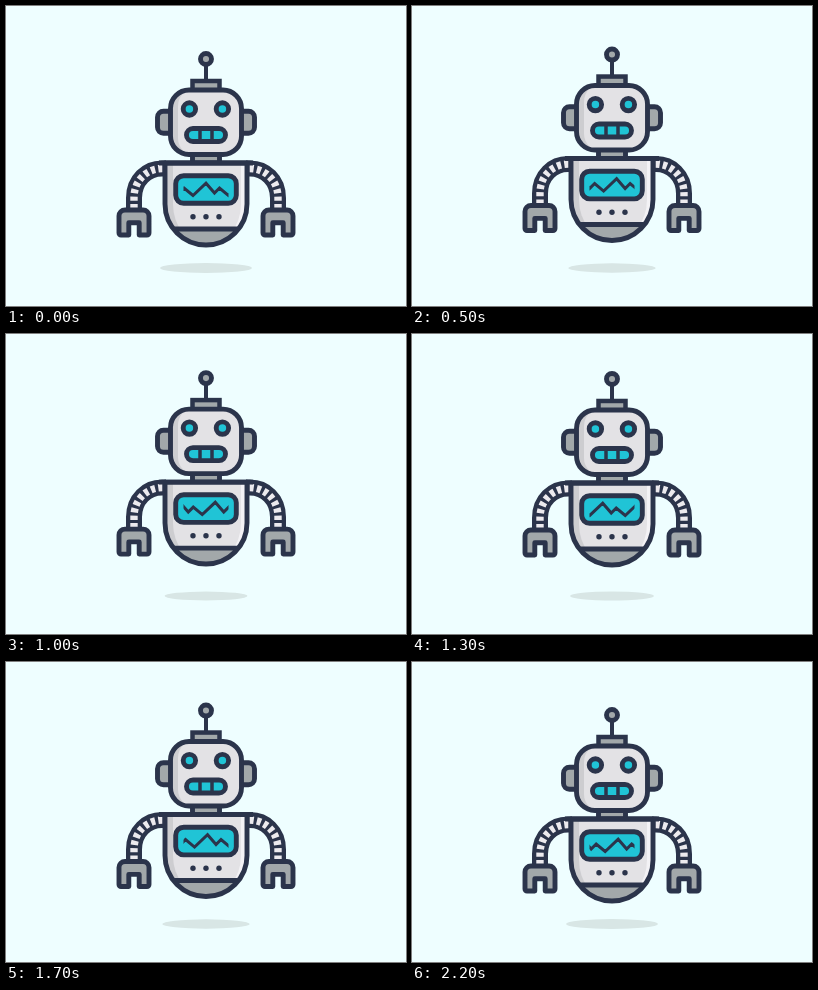
These frames come from a looping animation (400 px wide and 300 px high, 2.3 s). An HTML page:

```html
<!DOCTYPE html>
<html lang="en">
<head>
<meta charset="utf-8">
<title>Floating robot</title>
<style>
html, body { margin: 0; width: 100%; height: 100%; overflow: hidden; background: #eefeff; }
svg { display: block; width: 100%; height: 100%; }
.ink { stroke: #2b344b; stroke-width: 4.9; stroke-linejoin: round; }
.metal { fill: #a2a8aa; }
.light { fill: #e3e2e5; }
.shade { fill: #cdcdd0; }
.shine { fill: #f3f2f5; }
.glow { fill: #20c4d6; }
.none { fill: none; }
</style>
</head>
<body>
<svg viewBox="0 0 400 300">
  <defs>
    <clipPath id="headClip"><rect x="164.5" y="84" width="71" height="64.5" rx="18.5"/></clipPath>
    <clipPath id="bodyClip"><path d="M159 157H241V198A41 41 0 0 1 159 198Z"/></clipPath>
    <clipPath id="waveClip"><rect x="177.5" y="170" width="45" height="28"/></clipPath>
    <g id="arm">
      <path class="none" d="M160 162.5H156C141 162.5 128 174 128 192V204" stroke="#2b344b" stroke-width="16"/>
      <path class="none" d="M156.5 162.5C141 162.5 128 174 128 192V204" stroke="#eceaee" stroke-width="7.4" stroke-dasharray="4.2 3.2"/>
      <path class="ink metal" d="M115 229a2 2 0 0 1-2-2V210a6 6 0 0 1 6-6h18a6 6 0 0 1 6 6v17a2 2 0 0 1-2 2H133.2V216.8H122.8V229Z"/>
    </g>
    <rect id="ear" class="ink metal" x="151.5" y="105.2" width="22" height="22" rx="6"/>
    <circle id="eye" class="ink glow" cx="183.4" cy="103" r="6.2"/>
  </defs>

  <ellipse id="shadow" cx="200" cy="262" fill="#d8e6e5"/>

  <g id="robot">
    <path class="ink" d="M200 58V75" style="stroke-width:4"/>
    <circle class="ink metal" cx="200" cy="53" r="5.5"/>
    <rect class="ink metal" x="186.5" y="75" width="27" height="12" style="stroke-linejoin:miter;stroke-width:4.5"/>
    <rect class="ink metal" x="186.5" y="146" width="27" height="11"/>

    <use href="#ear"/>
    <use href="#ear" transform="matrix(-1 0 0 1 400 0)"/>
    <g clip-path="url(#headClip)">
      <rect class="shade" x="160" y="80" width="80" height="70"/>
      <rect class="light" x="172" y="82" width="76" height="68" rx="18"/>
    </g>
    <rect class="ink none" x="164.5" y="84" width="71" height="64.5" rx="18.5"/>
    <use href="#eye"/>
    <use href="#eye" x="33"/>
    <rect class="ink glow" x="180.5" y="122.5" width="39" height="13" rx="6.5"/>
    <path class="ink" d="M194 123V135M206 123V135" style="stroke-width:3.5"/>

    <use href="#arm"/>
    <use href="#arm" transform="matrix(-1 0 0 1 400 0)"/>
    <g clip-path="url(#bodyClip)">
      <rect class="shade" x="155" y="155" width="45" height="90"/>
      <rect class="shine" x="200" y="155" width="45" height="90"/>
      <path class="light" d="M167 155H235V198A34 41 0 0 1 167 198Z"/>
      <rect class="metal" x="155" y="223" width="90" height="20"/>
    </g>
    <path class="ink none" d="M159 157H241V198A41 41 0 0 1 159 198ZM167.5 223H232.5"/>
    <path class="ink" d="M153 157H247"/>
    <rect class="ink glow" x="169.7" y="169.7" width="60.6" height="27.6" rx="8"/>
    <g clip-path="url(#waveClip)">
      <path id="wave" class="ink none" style="stroke-width:3;stroke-linejoin:miter"/>
    </g>
    <g fill="#2b344b">
      <circle cx="187" cy="210.7" r="2.7"/>
      <circle cx="200" cy="210.7" r="2.7"/>
      <circle cx="213" cy="210.7" r="2.7"/>
    </g>
  </g>
</svg>
<script>
const LOOP = 2300, STEP = 100, PERIOD = 35.5;
const get = id => document.getElementById(id);

// One wave period: tall peak, valley, short peak, valley
const cycle = [[0, 177.2], [8.5, 187], [13.5, 182], [22.5, 189.5]];
const points = [];
for (let k = -1; k < 7; k++)
  for (const [x, y] of cycle) points.push([200 + k * PERIOD + x, y]);
get("wave").setAttribute("d", "M" + points.join("L"));

function draw(now) {
  const t = Math.floor(now % LOOP / STEP) * STEP;
  const lift = 1 - Math.abs(t - 1100) / 1100;
  get("robot").setAttribute("transform", `translate(0 ${-9.8 * lift})`);
  get("shadow").setAttribute("rx", 46 - 5 * lift);
  get("shadow").setAttribute("ry", 5 - 0.6 * lift);
  get("wave").setAttribute("transform", `translate(${-4 * PERIOD * t / LOOP} 0)`);
}

function tick() {
  draw(performance.now());
  requestAnimationFrame(tick);
}
tick();
</script>
</body>
</html>
```
